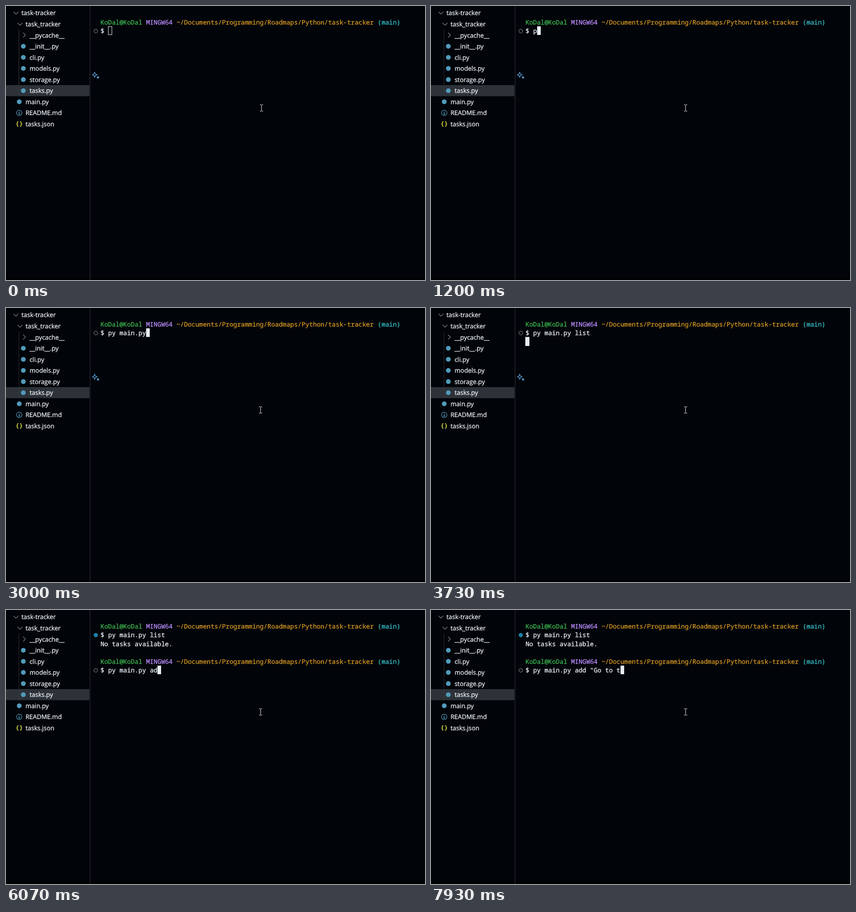
Recreate the animation shown at these times as an HTML page. Size 924 px wide and 606 px high, loop 8000 ms.

```html
<!DOCTYPE html>
<html lang="en">
<head>
<meta charset="utf-8">
<title>Terminal session</title>
<style>
  html, body { margin: 0; width: 100%; height: 100%; overflow: hidden; background: #010409; }
  svg { display: block; }
  text { white-space: pre; text-rendering: geometricPrecision; color: #f0f6fc;
    fill: currentColor; stroke: currentColor; stroke-width: .3px; }
  .tree text { font: 13.8px "Open Sans", "Noto Sans", sans-serif; }
  .term text { font: 13.958px "Noto Sans Mono", monospace; }
  .line { fill: none; stroke-linecap: round; stroke-linejoin: round; }
</style>
</head>
<body>
<svg id="stage" width="924" height="606" viewBox="0 0 924 606">
  <rect width="924" height="606" fill="#010409"/>
  <rect y="602" width="924" height="4" fill="#000"/>
  <rect y="175" width="184" height="24.5" fill="#2d3239"/>
  <rect x="185" width="1" height="606" fill="#30353c"/>
  <rect id="guide" x="28" y="52" width="1" height="147"/>
  <g id="tree" class="tree"></g>
  <rect id="bar" x="208" y="220.5" width="716" height="19.5" fill="#264f78"/>
  <g id="term" class="term"></g>
  <g id="spark" class="line" stroke="#5aa5e0" stroke-width="1.3">
    <path d="M195.5 146 Q196.3 151.2 201 152 Q196.3 152.8 195.5 158 Q194.7 152.8 190.5 152 Q194.7 151.2 195.5 146Z"/>
    <path d="M203 155.6 L205.4 158 L203 160.4 L200.6 158Z" fill="#5aa5e0" stroke-width=".8"/>
  </g>
  <rect id="cursor"/>
  <path id="mouse" fill="none" stroke="#f0f0f0"
    d="M-3.5 -7 H-.5 M.5 -7 H3.5 M0 -6.5 V6.5 M-3.5 7 H-.5 M.5 7 H3.5"/>
</svg>
<script>
const LOOP = 8000, LEFT = 208.4, CELL = 8.375, LINE = 19.5, ROW = 24.55;
const $ = id => document.getElementById(id);

function add(parent, tag, attrs, text) {
  const el = document.createElementNS('http://www.w3.org/2000/svg', tag);
  for (const k in attrs) el.setAttribute(k, attrs[k]);
  if (text) el.textContent = text;
  parent.appendChild(el);
  return el;
}
const set = (el, attrs) => { for (const k in attrs) el.setAttribute(k, attrs[k]); };
const show = (el, on) => el.setAttribute('visibility', on ? 'visible' : 'hidden');

// File tree
const stroke = (color, d, w) => (g, x, y) => add(g, 'path', {
  class: 'line', transform: `translate(${x} ${y})`, d, stroke: color, 'stroke-width': w });
const icons = {
  open: stroke('#9198a1', 'M-5 -2.2 L0 2.8 L5 -2.2', 1.1),
  shut: stroke('#9198a1', 'M-2 -5 L3 0 L-2 5', 1.1),
  py: (g, x, y) => add(g, 'circle', { cx: x, cy: y, r: 5.3, fill: '#519aba' }),
  info(g, x, y) {
    add(g, 'circle', { cx: x, cy: y, r: 6, fill: 'none', stroke: '#519aba', 'stroke-width': 1.2 });
    stroke('#519aba', 'M0 -3.1 V-2.9 M-1 -.6 H0 V3 M-1.2 3 H1.2', 1.4)(g, x, y);
  },
  json: stroke('#cbcb41', 'M-2.4 -5 Q-4.2 -5 -4.2 -3.4 V-1.4 Q-4.2 0 -5.6 0 Q-4.2 0 -4.2 1.4 V3.4 Q-4.2 5 -2.4 5' +
    'M2.4 -5 Q4.2 -5 4.2 -3.4 V-1.4 Q4.2 0 5.6 0 Q4.2 0 4.2 1.4 V3.4 Q4.2 5 2.4 5', 1.8)
};
[
  ['open', 0, 'task-tracker'], ['open', 1, 'task_tracker'], ['shut', 2, '__pycache__'],
  ['py', 2, '__init__.py'], ['py', 2, 'cli.py'], ['py', 2, 'models.py'],
  ['py', 2, 'storage.py'], ['py', 2, 'tasks.py'], ['py', 1, 'main.py'],
  ['info', 1, 'README.md'], ['json', 1, 'tasks.json']
].forEach(([icon, depth, name], i) => {
  const y = 15.35 + ROW * i, chevron = icon === 'open' || icon === 'shut';
  icons[icon]($('tree'), (chevron ? 22 : 20.2) + 9 * depth, y);
  add($('tree'), 'text', { x: 34 + 9 * depth, y: y + 5.1 }, name);
});

// Terminal
const term = $('term');
const write = (parent, row, col, text, color = '#f0f6fc') =>
  add(parent, 'text', { x: LEFT + col * CELL, y: 40.5 + row * LINE, style: `color:${color}` }, text);

function prompt(row) {
  const g = add(term, 'g', {});
  write(g, row, 0, 'KoDal@KoDal', '#3fb950');
  write(g, row, 12, 'MINGW64', '#be8fff');
  write(g, row, 20, '~/Documents/Programming/Roadmaps/Python/task-tracker', '#d99a22');
  write(g, row, 73, '(main)', '#39c5cf');
  write(g, row + 1, 0, '$');
  return { g, input: write(g, row + 1, 2, ''), dot: add(g, 'circle', { cx: 198, cy: 55.5 + row * LINE }) };
}
function setDot(dot, done) {
  set(dot, done
    ? { r: 4.7, fill: '#1b81a8', stroke: 'none' }
    : { r: 4, fill: 'none', stroke: '#4f5256', 'stroke-width': 1.8 });
}
const first = prompt(0), second = prompt(4);
const reply = write(term, 2, 0, 'No tasks available.');
setDot(second.dot, false);

// Each entry: time, characters of the command visible from then on
const listCmd = 'py main.py list', addCmd = 'py main.py add "Go to t';
const listKeys = [[1200, 1], [1330, 2], [1470, 3], [1600, 4], [1670, 5], [1800, 6], [1930, 7],
  [2530, 8], [2800, 9], [3000, 10], [3130, 12], [3330, 13], [3400, 14], [3600, 15]];
const recallKeys = [[4730, 15], [5330, 13], [5400, 11]];
const addKeys = [[5800, 12], [6070, 13], [6130, 14], [6270, 15], [6600, 16], [7130, 17], [7270, 18],
  [7470, 19], [7600, 20], [7670, 21], [7800, 22], [7930, 23]];
const typed = (text, keys, t) =>
  text.slice(0, keys.reduce((n, [at, len]) => t >= at ? len : n, 0));

// The block cursor sits on whole pixels
function placeCursor(row, col, focused) {
  const px = c => Math.round(LEFT + c * CELL), py = r => Math.round(25.4 + r * LINE);
  const x = px(col), y = py(row), width = px(col + 1) - x, height = py(row + 1) - y;
  set($('cursor'), focused
    ? { x, y, width, height, fill: '#e6edf3', stroke: 'none' }
    : { x: x + .5, y: y + .5, width: width - 1, height: height - 1, fill: 'none', stroke: '#e6edf3' });
}

function render(t) {
  const one = typed(listCmd, listKeys, t);
  const two = t < 5800 ? typed(listCmd, recallKeys, t) : typed(addCmd, addKeys, t);
  first.input.textContent = one;
  second.input.textContent = two;
  show(reply, t >= 4000);
  show(second.g, t >= 4330);
  show(second.dot, t >= 4400);
  setDot(first.dot, t >= 4400);
  show($('spark'), t < 4330);
  show($('bar'), t >= 330 && t < 1200);

  const [row, col] = t < 3730 ? [1, 2 + one.length]
    : t < 4000 ? [2, 0]
    : t < 4330 ? [3, 0] : [5, 2 + two.length];
  placeCursor(row, col, t >= 200);

  const mx = t < 70 ? 563.5 : t < 130 ? 562.5 : 561.5;
  set($('mouse'), { transform: `translate(${mx} 225.5)` });
  const fade = Math.min(1, Math.max(0, (t - 70) / 130));
  set($('guide'), { fill: '#3a3f46', opacity: 1 - .25 * fade });
}

const start = performance.now();
function tick() {
  render((performance.now() - start) % LOOP);
  requestAnimationFrame(tick);
}
render(0);
requestAnimationFrame(tick);
</script>
</body>
</html>
```
